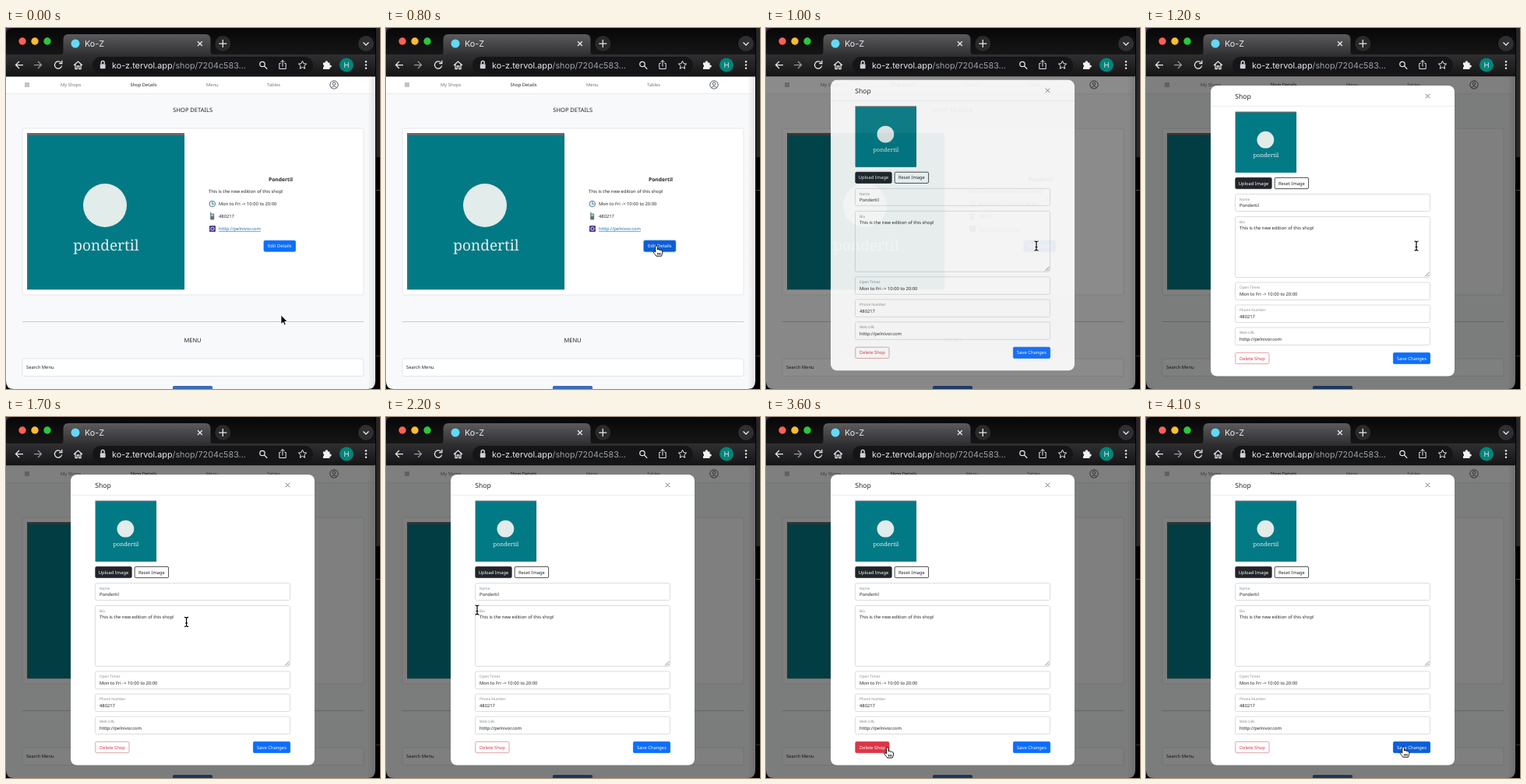
An HTML page that plays this animation: 480x464 px, repeating every 4.2 s.

```html
<!DOCTYPE html>
<html lang="en">
<head>
<meta charset="utf-8">
<title>Shop editor</title>
<style>
  html, body { margin: 0; width: 100%; height: 100%; overflow: hidden; background: #000; }
  svg { display: block; width: 100vw; height: 100vh; }
  text { font: 5.8px "Noto Sans", sans-serif; fill: #212529; text-rendering: geometricPrecision; white-space: pre; }
  .mid { text-anchor: middle; }
  .nav { fill: #777; }
  .label { font-size: 4.7px; fill: #858b91; }
  .heading { font-size: 7.5px; }
  .name { font-size: 6.7px; font-weight: 700; }
  .title { font-size: 8.6px; }
  .chrome { font: 10.8px Inter, sans-serif; fill: #e8eaed; }
  .wordmark { font: 19px "Noto Serif", serif; fill: #e2ecea; }
  .icon { fill: none; stroke: #e8eaed; stroke-width: 1.25; }
  .fine { stroke-width: 1; }
</style>
</head>
<body>
<svg id="stage" viewBox="0 0 480 464" preserveAspectRatio="none"></svg>
<script>
const LOOP = 4200;
const MODAL_OPEN = 865;
const SHOP = { name: 'Pondertil', bio: 'This is the new edition of this shop!',
  hours: 'Mon to Fri -> 10:00 to 20:00', phone: '480217', web: 'htttp://pelnivor.com' };

const text = (x, y, str, cls = '', extra = '') =>
  `<text x="${x}" y="${y}" class="${cls}" ${extra}>${str.replace('>', '&gt;')}</text>`;
const rect = (x, y, w, h, fill, extra = '') =>
  `<rect x="${x}" y="${y}" width="${w}" height="${h}" fill="${fill}" ${extra}/>`;
const circle = (x, y, r, fill, extra = '') =>
  `<circle cx="${x}" cy="${y}" r="${r}" fill="${fill}" ${extra}/>`;
const path = (d, extra = 'class="icon"') => `<path d="${d}" ${extra}/>`;
const line = (y, x1, x2, color) => rect(x1, y, x2 - x1, 1, color);
const gradient = (id, from, to, extra = 'x2="0" y2="1"') =>
  `<linearGradient id="${id}" ${extra}><stop stop-color="${from}"/><stop offset="1" stop-color="${to}"/></linearGradient>`;
const button = (id, b, label, fill, stroke, color) =>
  `<g id="${id}">${rect(b.x, b.y, b.w, b.h, fill, `rx="1.6" stroke="${stroke}" stroke-width=".8"`)}` +
  text(b.x + b.w / 2, b.y + b.h / 2 + 2.1, label, 'mid', `style="fill:${color}"`) + '</g>';
const box = (x, y, w, h) => ({ x, y, w, h });
const field = (b, label, value) =>
  rect(b.x, b.y, b.w, b.h, '#fff', 'rx="1.8" stroke="#d0d5da" stroke-width=".8"') +
  text(120, b.y + 8.2, label, 'label') + text(120, b.y + 16.8, value);

const editBox = box(331, 273.3, 40.6, 13.9);
const deleteBox = box(114.8, 417.4, 43.2, 14.2);
const saveBox = box(317.4, 417.4, 47.2, 14.2);
const fields = [
  [box(114.5, 213.5, 250, 22), 'Name', SHOP.name],
  [box(114.5, 242.5, 250, 78), 'Bio', SHOP.bio],
  [box(114.5, 327, 250, 22.5), 'Open Times', SHOP.hours],
  [box(114.5, 356, 250, 22.5), 'Phone Number', SHOP.phone],
  [box(114.5, 385, 250, 22.5), 'Web URL', SHOP.web],
];

const gradients = gradient('stripFill', '#070708', '#161617') + gradient('tabFill', '#5b5b5d', '#303032') +
  gradient('toolbarFill', '#303032', '#141415') +
  gradient('edgeFill', 'rgba(225,225,225,0)', '#e1e1e1', 'x2="1" y2="0"');

const shopImage = `<g id="shopImage">
  ${rect(27, 135, 202, 201.3, '#62696d')}${rect(28.5, 138, 200, 198, '#027a85')}
  ${circle(127, 228, 28, '#e2ecea')}
  ${text(128.5, 286, SHOP.name.toLowerCase(), 'wordmark mid')}</g>`;

const browser = `
  ${rect(0, 0, 475, 35, 'url(#stripFill)')}
  ${path('M70 35Q73.5 35 73.5 30V15Q73.5 8 80 8H256Q262.5 8 262.5 15V30Q262.5 35 266 35Z', 'fill="url(#tabFill)"')}
  ${rect(0, 34, 475, 28.5, 'url(#toolbarFill)')}
  ${circle(21, 17, 4.7, '#ff5f57')}${circle(37, 17, 4.7, '#febc2e')}${circle(53, 17, 4.7, '#28c840')}
  ${circle(89, 20, 5.5, '#61dafb')}
  ${text(101, 24, 'Ko-Z', 'chrome')}
  ${path('M246 17.2l5.8 5.8m0-5.8l-5.8 5.8')}
  ${circle(278.3, 20, 10, '#2a2a2b')}${path('M273.3 20h10m-5-5v10')}
  ${circle(462, 20, 10, '#2f2f31')}${path('M458.5 18.5l3.5 3.5 3.5-3.5')}
  ${path('M22 47.5H12.5m4.5-4.5l-4.5 4.5 4.5 4.5')}
  ${path('M36 47.5h9.5m-4.5-4.5l4.5 4.5-4.5 4.5', 'class="icon" stroke-opacity=".6"')}
  ${path('M70.5 44.5a4.6 4.6 0 1 0 1.1 4M71.8 41.8v3.7h-3.7')}
  ${path('M87 48l5.5-5 5.5 5m-9-1.5v6h2.3v-3.6h2.4v3.6h2.3v-6')}
  ${rect(111, 37, 283, 21.5, '#151517', 'rx="10.7"')}
  ${rect(120.8, 46.3, 6.8, 6, '#d0d2d5', 'rx="1"')}${path('M122.2 46v-1.6a2 2 0 0 1 4 0V46')}
  <text x="136" y="51.8" class="chrome">ko-z.tervol.app<tspan fill="#9aa0a6">/shop/7204c583...</tspan></text>
  ${circle(329, 46.5, 3.2, 'none', 'class="icon"')}${path('M331.4 48.9l3.8 3.8')}
  ${path('M352.5 45.5h-1.7v7h8.4v-7h-1.7m-2.5 4v-8m-2.5 2.5l2.5-2.5 2.5 2.5', 'class="icon fine"')}
  ${path('M380.5 42.3l1.5 3.4 3.7.4-2.8 2.5.8 3.7-3.2-1.9-3.2 1.9.8-3.7-2.8-2.5 3.7-.4Z', 'class="icon fine"')}
  ${path('M407 44.5h2.8a1.7 1.7 0 1 1 3.2 0h2.5v3a1.7 1.7 0 1 1 0 3.2v2.3H407v-2.6a1.7 1.7 0 0 0 0-3.2Z', 'fill="#f1f3f4"')}
  ${circle(437, 47.5, 9, '#00857a')}${text(437, 50.9, 'H', 'chrome mid', 'style="font-size:9.5px"')}
  ${[43.3, 47.5, 51.7].map(y => circle(462, y, 1.2, '#e8eaed')).join('')}`;

const page = `
  ${rect(0, 62, 474, 402, '#f8f9fa')}${rect(0, 62.5, 474, 21.5, '#fff')}${line(84, 0, 474, '#e9ebed')}
  ${rect(24, 70, 6, 6, '#c2c2c2')}
  ${text(70, 75, 'My Shops', 'nav')}${text(159.5, 75, 'Shop Details')}
  ${text(257, 75, 'Menu', 'nav')}${text(335, 75, 'Tables', 'nav')}
  <g fill="none" stroke="#343a40" stroke-width=".8">${circle(421, 73, 5.2, 'none')}
  ${circle(421, 71.6, 1.8, 'none')}${path('M417.4 76.7q3.6-3.6 7.2 0', '')}</g>
  ${text(239.7, 107.9, 'SHOP DETAILS', 'heading mid')}
  ${rect(21, 129, 438, 214, '#fff', 'rx="2" stroke="#e1e4e7" stroke-width=".9"')}
  ${rect(229, 138, 2.5, 198, '#e3eded')}
  ${shopImage}
  ${text(352.5, 197.3, SHOP.name, 'name mid')}
  ${text(260, 212, SHOP.bio)}
  ${circle(264.8, 226, 3.8, '#e6f3f8', 'stroke="#55859c" stroke-width="1"')}
  ${path('M264.8 223.4v2.8h2', 'fill="none" stroke="#333" stroke-width=".7"')}
  ${text(273, 228, SHOP.hours)}
  ${rect(262.2, 238.5, 5, 8, '#60747c', 'rx="1"')}${rect(262.2, 236.8, 1.2, 2.5, '#60747c')}
  ${rect(263.2, 239.5, 3, 2.3, '#a9d0c4')}${text(273, 244, SHOP.phone)}
  ${rect(261, 254, 8, 8, '#4b3b91', 'rx="1"')}${circle(265, 258, 2.2, 'none', 'stroke="#e7e1ff" stroke-width=".9"')}
  ${text(273, 260, SHOP.web, '', 'style="fill:#1771b8;text-decoration:underline"')}
  ${rect(editBox.x - 1.3, editBox.y - 1.3, editBox.w + 2.6, editBox.h + 2.6, '#a5cdf5', 'rx="2.4" id="focusRing"')}
  ${button('edit', editBox, 'Edit Details', '#0d6efd', '#0d6efd', '#fff')}
  ${line(377, 21, 459, '#c9cbcd')}
  ${text(239.5, 404.2, 'MENU', 'heading mid')}
  ${rect(21, 425, 438, 22.5, '#fff', 'rx="2" stroke="#dee2e6" stroke-width=".9"')}
  ${text(26, 438.3, 'Search Menu')}
  ${rect(214, 460, 51, 8, '#3b6cb8', 'rx="1.6"')}
  ${rect(464, 62, 10, 402, 'url(#edgeFill)')}`;

const modal = `
  ${rect(83, 74, 313, 373.5, '#fff', 'rx="8"')}
  ${text(114.3, 90.8, 'Shop', 'title')}
  ${path('M358.8 84.8l5.4 5.4m0-5.4l-5.4 5.4', 'stroke="#777" stroke-width="1"')}
  ${line(100, 83, 396, '#eceef0')}
  <use href="#shopImage" transform="translate(104 55) scale(.389)"/>
  ${button('upload', box(114.8, 192.4, 46.4, 14.2), 'Upload Image', '#212529', '#212529', '#fff')}
  ${button('reset', box(165.2, 192.4, 43.4, 14.2), 'Reset Image', '#fff', '#212529', '#212529')}
  ${fields.map(f => field(...f)).join('')}
  ${path('M358 319.5l5.5-5.5m-2.5 5.5l2.5-2.5', 'stroke="#555" stroke-width=".7"')}
  ${button('delete', deleteBox, 'Delete Shop', '#fff', '#dc8b93', '#dc3545')}
  ${button('save', saveBox, 'Save Changes', '#0d6efd', '#0d6efd', '#fff')}`;

const beam = 'M-2.6-6Q0-6 0-4.5Q0-6 2.6-6M0-4.5V4.5M-2.6 6Q0 6 0 4.5Q0 6 2.6 6M-1.4 1.5H1.4';
const cursors = `<g id="cursor">
  <g id="arrow">${path('M0 0V11.6L2.7 9.2 4.4 13 6.2 12.2 4.6 8.5H8.2Z', 'fill="#000" stroke="#fff" stroke-width=".8"')}</g>
  <g id="hand">${path('M-1.2 1.5C-1.2-.6 1.4-.6 1.4 1.5V5C2 4.2 3.6 4.4 3.8 5.5 4.5 4.8 5.8 5 6 6 6.8 5.6 7.8 6 7.8 7V9.5C7.8 11 6.5 12 6.5 13.2H-.2C-.8 11.5-3.5 9.5-4 7.8-4.2 6.6-2.5 6.5-1.2 8ZM1.6 9v2.6M3.4 9v2.6M5.2 9v2.6',
    'fill="#fff" stroke="#000" stroke-width=".9"')}</g>
  <g id="beam" fill="none">${path(beam, 'stroke="#fff" stroke-width="2.4"')}${path(beam, 'stroke="#000" stroke-width="1.2"')}</g>
</g>`;

const frame = `
  ${path('M0 0H9Q0 0 0 9Z', 'fill="#3b2744"')}${path('M474 0h-8q8 0 8 8Z', 'fill="#000"')}
  ${path('M0 454Q0 464 10 464H0Z', 'fill="#000"')}${path('M474 454q0 10-10 10h10Z', 'fill="#000"')}
  ${rect(474, 0, 6, 464, '#000')}${rect(475, 0, 5, 166, '#262628')}
  ${line(208, 475, 480, '#444')}${line(421, 475, 480, '#333')}`;

// The browser bars come after the modal, which slides in from beneath them
document.getElementById('stage').innerHTML = gradients + page +
  rect(0, 62.5, 474, 401.5, '#000', 'id="backdrop"') +
  `<g id="modal">${modal}</g>` + browser + frame + cursors;

const $ = id => document.getElementById(id);
const clamp = v => Math.min(1, Math.max(0, v));
const mix = (a, b, u) => a + (b - a) * u;
const mixColor = (a, b, u) => `rgb(${a.map((v, i) => Math.round(mix(v, b[i], u)))})`;
const inside = (p, b) => p.x >= b.x && p.x <= b.x + b.w && p.y >= b.y && p.y <= b.y + b.h;

const BLUE = [13, 110, 253], DARK_BLUE = [11, 94, 215], RED = [220, 53, 69], WHITE = [255, 255, 255];

// Each move: start, end, from x, from y, to x, to y
const moves = [
  [100, 700, 353, 369, 347, 280],
  [1300, 2100, 347, 279, 117, 248],
  [2300, 3000, 117, 248, 123, 425],
  [3450, 4050, 123, 425, 330, 424],
];

function pointer(t) {
  const [start, end, x0, y0, x1, y1] = moves.filter(m => t >= m[0]).pop() || moves[0];
  const u = clamp((t - start) / (end - start));
  const s = u * u * (3 - 2 * u);
  return { x: mix(x0, x1, s), y: mix(y0, y1, s) };
}

// 150 ms colour fade on entering and leaving a button
const hover = (t, enter, leave) => clamp((t - enter) / 150) - clamp((t - leave) / 150);

function paint(id, fill, stroke, color) {
  const [shape, label] = $(id).children;
  shape.setAttribute('fill', fill);
  shape.setAttribute('stroke', stroke);
  label.style.fill = color;
}

function draw(t) {
  const isOpen = t >= MODAL_OPEN;
  const fade = clamp((t - MODAL_OPEN) / 150);
  const slide = -20 * (1 - clamp((t - MODAL_OPEN) / 300)) ** 1.7;
  $('backdrop').setAttribute('opacity', fade / 2);
  $('modal').setAttribute('opacity', fade);
  $('modal').setAttribute('transform', `translate(0 ${slide})`);

  const editFill = mixColor(BLUE, DARK_BLUE, hover(t, 600, MODAL_OPEN));
  paint('edit', editFill, editFill, '#fff');
  $('focusRing').setAttribute('opacity', clamp((t - 750) / 100));
  const deleteHover = hover(t, 2974, 3605);
  paint('delete', mixColor(WHITE, RED, deleteHover), mixColor([220, 139, 147], RED, deleteHover),
    mixColor(RED, WHITE, deleteHover));
  const saveFill = mixColor(BLUE, DARK_BLUE, hover(t, 3960, LOOP));
  paint('save', saveFill, saveFill, '#fff');

  const p = pointer(t);
  const buttons = isOpen ? [deleteBox, saveBox] : [editBox];
  const kind = buttons.some(b => inside(p, b)) ? 'hand'
    : isOpen && fields.some(([b]) => inside(p, b)) ? 'beam' : 'arrow';
  for (const id of ['arrow', 'hand', 'beam']) $(id).style.display = id === kind ? '' : 'none';
  $('cursor').setAttribute('transform', `translate(${p.x} ${p.y})`);
}

const startTime = performance.now();
function tick() {
  draw((performance.now() - startTime) % LOOP);
  requestAnimationFrame(tick);
}
tick();
</script>
</body>
</html>
```
